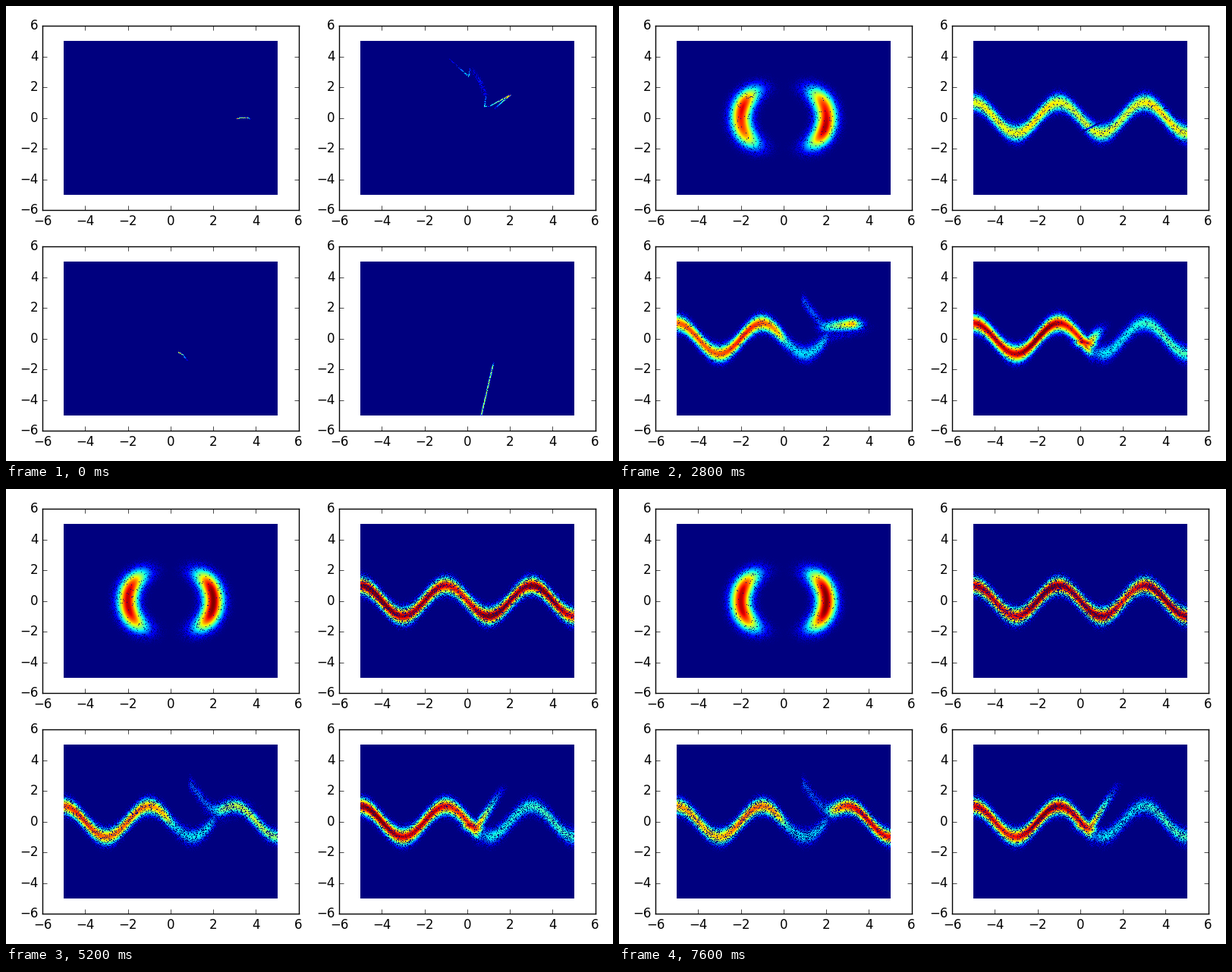
A matplotlib script that plays this animation: 800 by 600 pixels, repeating every 8000 ms.

```python
import numpy as np
import matplotlib.pyplot as plt
from matplotlib.animation import FuncAnimation

FRAMES, INTERVAL = 20, 400
NX, NY = 282, 203

plt.rcParams.update({
    "font.family": "DejaVu Sans", "font.size": 12, "axes.linewidth": 1.0,
    "xtick.direction": "in", "ytick.direction": "in",
    "xtick.top": True, "ytick.right": True,
    "xtick.major.size": 4, "ytick.major.size": 4,
    "xtick.major.width": 0.5, "ytick.major.width": 0.5,
    "xtick.major.pad": 4, "ytick.major.pad": 4,
    "ytick.alignment": "center",
})

xs = -5 + 10 * (np.arange(NX) + 0.5) / NX
ys = -5 + 10 * (np.arange(NY) + 0.5) / NY
X, Y = np.meshgrid(xs, ys)
WAVE = -np.sin(np.pi * xs / 2)


def ramp(value, start, end):
    return np.clip((value - start) / (end - start), 0, 1)


def step(x, edge, width=.1):
    """Smooth rise from 0 to 1 around an edge."""
    return 1 / (1 + np.exp(-np.clip((x - edge) / width, -50, 50)))


def bell(offset, sigma):
    return np.exp(-0.5 * (offset / sigma) ** 2)


def wobble(frame):
    """Slow uneven brightness along a wave."""
    phase = np.random.default_rng(frame).uniform(0, 2 * np.pi, 2)
    return 1 + .05 * np.sin(xs + phase[0]) + .04 * np.sin(2.3 * xs + phase[1])


def stroke(sigma, *points):
    """Soft polyline through (x, y, value) points."""
    out = np.zeros_like(X)
    for (x0, y0, v0), (x1, y1, v1) in zip(points, points[1:]):
        dx, dy = x1 - x0, y1 - y0
        t = np.clip(((X - x0) * dx + (Y - y0) * dy) / (dx * dx + dy * dy), 0, 1)
        distance = np.hypot(X - x0 - t * dx, Y - y0 - t * dy)
        out = np.maximum(out, (v0 + t * (v1 - v0)) * bell(distance, sigma))
    return out


def merge(*layers):
    return np.maximum.reduce(layers)


def collapsed_fields():
    """Thin streaks that start the loop."""
    thin = .024
    ring = stroke(thin, (3.12, -.05, .9), (3.25, 0, .5), (3.6, 0, .6), (3.75, -.1, .1))
    wave = merge(
        stroke(thin, (-.9, 3.9, .03), (.07, 2.68, .45), (.12, 3.2, .15)),
        stroke(.08, (.2, 3.2, .05), (.57, 2.45, .16), (.85, 1.5, .1)),
        stroke(thin, (.87, 1.4, .2), (.8, .73, .42), (1.1, .8, .42),
               (2, 1.48, .85), (1.2, .5, .05)))
    fork = stroke(thin, (.38, -.9, .8), (.56, -1.05, .5), (.8, -1.45, .05))
    split = stroke(thin, (.65, -5, .62), (1.18, -1.85, .6), (1.25, -1.5, .05))
    return ring, wave, fork, split


def ring_field(frame):
    field = bell(np.hypot(X, Y) - 2, .4) * bell(np.abs(X) - 2, .6)
    left = .95 * ramp(frame, 2, 5)
    lean = 1 - .13 * (1 - ramp(frame, 4, 10)) * (1 + np.tanh(Y * np.sign(X)))
    return np.where(X < 0, left, 1) * field * lean


def wave_field(frame):
    spread = bell(xs - 1, 1.5 * frame) if frame < 4 else 1
    level = np.minimum(.97, .2 + .063 * frame)
    field = level * spread * wobble(frame) * bell(Y - WAVE, .38)
    # A dark scar drifts up through the trough and heals.
    x, y = .6 - .17 * (frame - 4), -1.5 + .2 * (frame - 4)
    scar = .9 * ramp(frame, 9, 8)
    return field * (1 - stroke(.045, (x, y, scar), (x + .85, y + .6, scar)))


def fork_field(frame):
    settled = ramp(frame, 11, 15)
    level = np.interp(frame, [4, 8, 15], [.52, .92, .76])
    left = level * step(-xs, .05) * step(xs, 1 - 1.6 * frame, .3)
    well = .35 * step(xs, -.05) * step(-xs, -2.1)
    lower = wobble(frame) * (left + well) * bell(Y - WAVE, .36)

    bend = WAVE + 3 * bell(xs - 1, .6) + 1.6 * np.maximum(0, 1.2 - xs)
    right = .22 + settled * .68 * step(xs, 2.2, .15)
    end = 3.3 + 5 * settled
    arm = wobble(frame) * right * step(xs, .85, .03) * step(-xs, -end, .15)
    upper = arm * bell(Y - bend, .3 + .05 * settled)

    glow = (1 - settled) * min(.92, .25 + .07 * frame)
    wedge = stroke(.27, (2, .75, .5 * glow), (3.2, .95, glow), (3.9, .75, .03))
    mist = stroke(.25, (1, -.8, .1), (2, 0, .1), (3.6, .6, .1)) * (1 - settled)
    # A faint sheet is shed over the fork just before it settles.
    shed = .16 * ramp(frame, 7, 11) * (frame < 12)
    sheet = stroke(.15, (.45, 1.85, shed), (1.6, 1.05, shed),
                   (2.4, .6, shed), (4.9, -.55, shed))
    return merge(lower, upper, wedge, mist, sheet)


def split_field(frame):
    level = np.minimum(.95, .55 + .06 * frame)
    left = level * step(-xs, -.5) * step(xs, 1 - 2 * frame, .3)
    right = (.36 + .02 * (xs - 1)) * step(xs, .75)
    field = wobble(frame) * (left + right) * bell(Y - WAVE, .37)

    reach = ramp(frame, 4, 14)
    tip = (.8 + .95 * reach, .2 + 2.2 * reach, .08)
    foot = (.4, -.25 - .25 * reach, .85)
    sigma = .22 - .08 * reach
    arm = merge(stroke(.25, (.1, -.2, level), foot), stroke(sigma, foot, tip))
    tail = stroke(.13, (.55, -1.45, .1), (.85, -.8, .25))
    return merge(field, arm, tail)


FIELDS = ring_field, wave_field, fork_field, split_field
FINAL_FILL = 4.5, 1.25, 1.7, 1.75


def fill(final, frame):
    """Cell coverage, thinning out as the loop goes on."""
    if frame == 0:
        return 2.5
    return final + (4.5 - final) * np.exp(-max(0, frame - 4) / 4)


def speckle(field, coverage, seed):
    chance = 1 - np.exp(-coverage * np.sqrt(field))
    return np.where(np.random.default_rng(seed).random(field.shape) < chance, field, 0)


fig = plt.figure(figsize=(8, 6), dpi=100, facecolor="white")
images = []
for bottom in (269.4, 560.4):
    for left in (48.2, 439.2):
        ax = fig.add_axes([left / 800, 1 - bottom / 600, 337.35 / 800, 243 / 600])
        images.append(ax.imshow(np.zeros((NY, NX)), extent=(-5, 5, -5, 5),
                                origin="lower", aspect="auto", cmap="jet",
                                vmin=0, vmax=1, interpolation="nearest"))
        ax.set(xlim=(-6, 6), ylim=(-6, 6),
               xticks=range(-6, 7, 2), yticks=range(-6, 7, 2))


def update(frame):
    fields = [f(frame) for f in FIELDS] if frame else collapsed_fields()
    for i, (image, field) in enumerate(zip(images, fields)):
        image.set_data(speckle(field, fill(FINAL_FILL[i], frame), 10 * frame + i))
    return images


anim = FuncAnimation(fig, update, frames=FRAMES, interval=INTERVAL,
                     repeat=True, repeat_delay=0)
plt.show()
```
